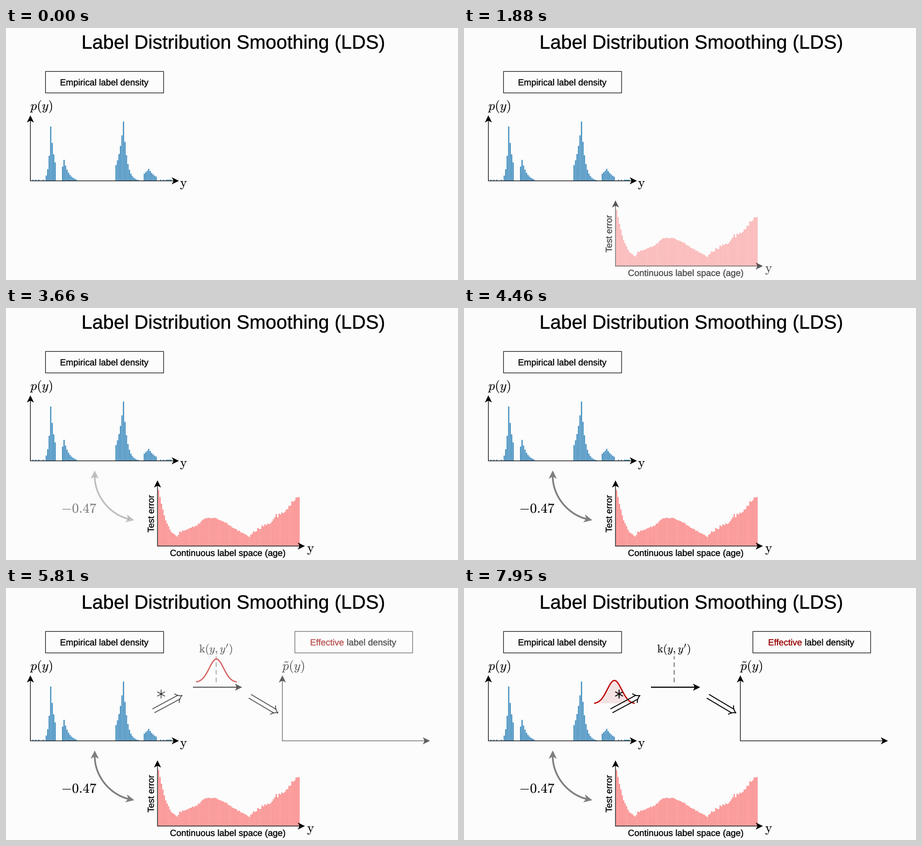
Write a matplotlib script that moves like this. It is 1001x560 px and loops after 7990 ms.

```python
import math

import matplotlib.pyplot as plt
import numpy as np
from matplotlib.animation import FuncAnimation
from matplotlib.patches import PathPatch
from matplotlib.path import Path
from matplotlib.patheffects import Stroke
from matplotlib.transforms import Affine2D

W, H, DPI = 1001, 560, 100
FRAMES, INTERVAL = 235, 34
PX = 72 / DPI  # points per pixel

BLUE, PINK, RED, GRAY = "#448fc0", "#fb8080", "#c00000", "#7f7f7f"

plt.rcParams.update({
    "font.family": "Liberation Sans",
    "mathtext.fontset": "cm",
    "text.hinting": "no_hinting",
})

fig = plt.figure(figsize=(W / DPI, H / DPI), dpi=DPI, facecolor="#fcfcfc")
ax = fig.add_axes([0, 0, 1, 1])
ax.set_xlim(0, W)
ax.set_ylim(H, 0)
ax.axis("off")

# Parts that fade in together share a list.
base, errors, link, kernel = [], [], [], []


def label(group, x, y, text, size, color="black", **kw):
    """Write text from a baseline origin, with a hairline outline for weight."""
    weight = 0.15 if "$" in text else 0.45
    outline = Stroke(linewidth=weight * PX, foreground=color, snap=False, joinstyle="round")
    group.append(ax.text(x, y, text, fontsize=size * PX, color=color, ha="left",
                         va="baseline", path_effects=[outline], **kw))


def shape(group, path, lw=0, edge="none", fill="none", **kw):
    patch = PathPatch(path, lw=lw * PX, edgecolor=edge, facecolor=fill, snap=False, **kw)
    ax.add_patch(patch)
    group.append(patch)
    return patch


def line(group, points, lw, color="black", **kw):
    return shape(group, Path(points), lw, color, **kw)


def local(tip, angle, points):
    """Place points given along and across a direction, seen from the tip."""
    c, s = math.cos(angle), math.sin(angle)
    return [(tip[0] + u * c - v * s, tip[1] + u * s + v * c) for u, v in points]


def head(group, tip, angle, length=16, color="black"):
    half, notch = 0.49 * length, 0.74 * length
    pts = local(tip, angle, [(0, 0), (-length, half), (-notch, 0), (-length, -half), (0, 0)])
    shape(group, Path(pts, closed=True), fill=color)


def axes_pair(group, x, y, top, right):
    line(group, [(x, y + 0.6), (x, top + 10)], 1.4)
    line(group, [(x, y), (right - 10, y)], 1.4)
    head(group, (x, top), -math.pi / 2)
    head(group, (right, y), 0)


def rect(x0, y0, x1, y1):
    return Path([(x0, y0), (x1, y0), (x1, y1), (x0, y1), (x0, y0)], closed=True)


def bars(group, items, floor, width, color):
    rects = [rect(x - width / 2, floor - h, x + width / 2, floor) for x, h in items]
    shape(group, Path.make_compound_path(*rects), fill=color)


def double_arrow(group, start, tip):
    angle = math.atan2(tip[1] - start[1], tip[0] - start[0])
    length = math.dist(start, tip)
    for side in (-1, 1):
        line(group, local(tip, angle, [(-length, 4.8 * side), (-7.5, 4.8 * side)]), 2.1)
        barb = local(tip, angle, [(0, 0), (-8.5, 3 * side), (-12.5, 11 * side)])
        shape(group, Path(barb, [Path.MOVETO, Path.CURVE3, Path.CURVE3]), 2.1, "black",
              capstyle="round")


# Empirical density
label(base, 167.2, 46, "Label Distribution Smoothing (LDS)", 42.9)
shape(base, rect(87.5, 96.5, 349, 144.3), 1.3, "black")
label(base, 119.5, 127.5, "Empirical label density", 19.7)
label(base, 54, 182, "$p(y)$", 28.7)
label(base, 385.5, 353, r"$\mathrm{y}$", 29)

# Peaks: first bar, top bar, last bar, height, decay to the left and right
PEAKS = [
    (-3, 0, 3, 121, 1.3, 2.8),
    (8, 9, 17, 47, 2.6, 3.2),
    (44, 49, 59, 132, 3.8, 2.4),
    (63, 66, 71, 27, 6, 4.8),
]


def density():
    for first, top, last, height, left, right in PEAKS:
        for i in range(first, last + 1):
            reach = left if i < top else right
            yield 99 + 3.29 * i, height * math.exp(-abs(i - top) / reach)
    for i in (-12, -10, -8, -5, 74, 76, 78, 79, 80, 81):
        yield 99 + 3.29 * i, 3


bars(base, density(), 340, 2.7, BLUE)
axes_pair(base, 54, 339.6, 194, 383)

# Test error: a line through a few points with growing roughness
KNOT_X = [0, 2, 5, 9, 13, 15, 27, 32, 39, 45, 52, 64, 66, 75, 85, 95, 99]
KNOT_H = [125, 93, 57, 31, 21, 31, 46, 61, 63, 56, 42, 20, 29, 46, 69, 98, 109]
n = np.arange(100)
rough = np.random.default_rng(4).normal(0, 1, 100) * np.interp(n, [0, 60, 99], [0.5, 1, 4])
bars(errors, zip(338 + 3.14 * n, np.interp(n, KNOT_X, KNOT_H) + rough), 529, 2.4, PINK)
axes_pair(errors, 335.5, 529, 383, 662)
label(errors, 327.5, 498.8, "Test error", 19.7, rotation=90, rotation_mode="anchor")
label(errors, 363, 551, "Continuous label space (age)", 19.7)
label(errors, 667, 542.5, r"$\mathrm{y}$", 29)

# Correlation
arc = Path([(196.5, 374), (196.5, 418), (230, 459), (272, 469)],
           [Path.MOVETO] + [Path.CURVE4] * 3)
shape(link, arc, 3.8, GRAY)
head(link, (196.5, 361), -math.pi / 2, 18.5, GRAY)
head(link, (284, 471.5), 0.22, 18.5, GRAY)
label(link, 122.5, 455, "$-0.47$", 30.4)

# Kernel and effective density
label(kernel, 428, 143, r"$\mathrm{k}(y,y')$", 24.5)
line(kernel, [(465.5, 209.5), (465.5, 152)], 2.4, GRAY, linestyle=(0, (4.2, 2.9)))
line(kernel, [(414, 220.5), (512, 220.5)], 2.5)
head(kernel, (523, 220.5), 0)

u = np.linspace(-45, 45, 61)
bell = Path(np.column_stack([466 + u, 209.8 - 51.8 * np.exp(-(u / 16) ** 2 / 2)]))
area = shape([], bell, fill=RED)
curve = shape(kernel, bell, 2.7, RED)

for k in range(6):
    a = math.radians(60 * k + 30)
    line(kernel, [(343.5, 235.5), (343.5 + 9.2 * math.cos(a), 235.5 + 9.2 * math.sin(a))],
         2.1, capstyle="round")
double_arrow(kernel, (326.5, 273), (389.5, 239))
double_arrow(kernel, (540, 240.5), (602, 277.5))

shape(kernel, rect(639.7, 96.5, 900.5, 144.3), 1.3, "black")
label(kernel, 673.4, 127.5, "Effective", 19.7, "#980000")
label(kernel, 754.6, 127.5, "label density", 19.7)
label(kernel, 612, 182, r"$\tilde{p}(y)$", 28.7)
axes_pair(kernel, 612, 339.6, 194, 939)

FADE, SLIDE = 1200, 2000
STARTS = [(errors, 1100), (link, 3070), (kernel, 5040)]
SLIDE_START = 7100


def ramp(t, start, length):
    return min(max((t - start) / length, 0), 1)


def draw(i):
    t = i * INTERVAL
    for group, start in STARTS:
        alpha = ramp(t, start, FADE)
        for part in group:
            part.set_alpha(alpha)
            part.set_visible(alpha > 0)

    # The kernel glides towards the first peak of the histogram.
    s = 0.5 - 0.5 * math.cos(math.pi * ramp(t, SLIDE_START, SLIDE))
    move = Affine2D().translate(-367 * s, 131 * s) + ax.transData
    curve.set_transform(move)
    area.set_transform(move)
    area.set_alpha(0.1 * ramp(t, SLIDE_START, 200))
    area.set_visible(t > SLIDE_START)
    return []


anim = FuncAnimation(fig, draw, frames=FRAMES, init_func=lambda: draw(0),
                     interval=INTERVAL, repeat=True, repeat_delay=0, blit=False)
plt.show()
```
